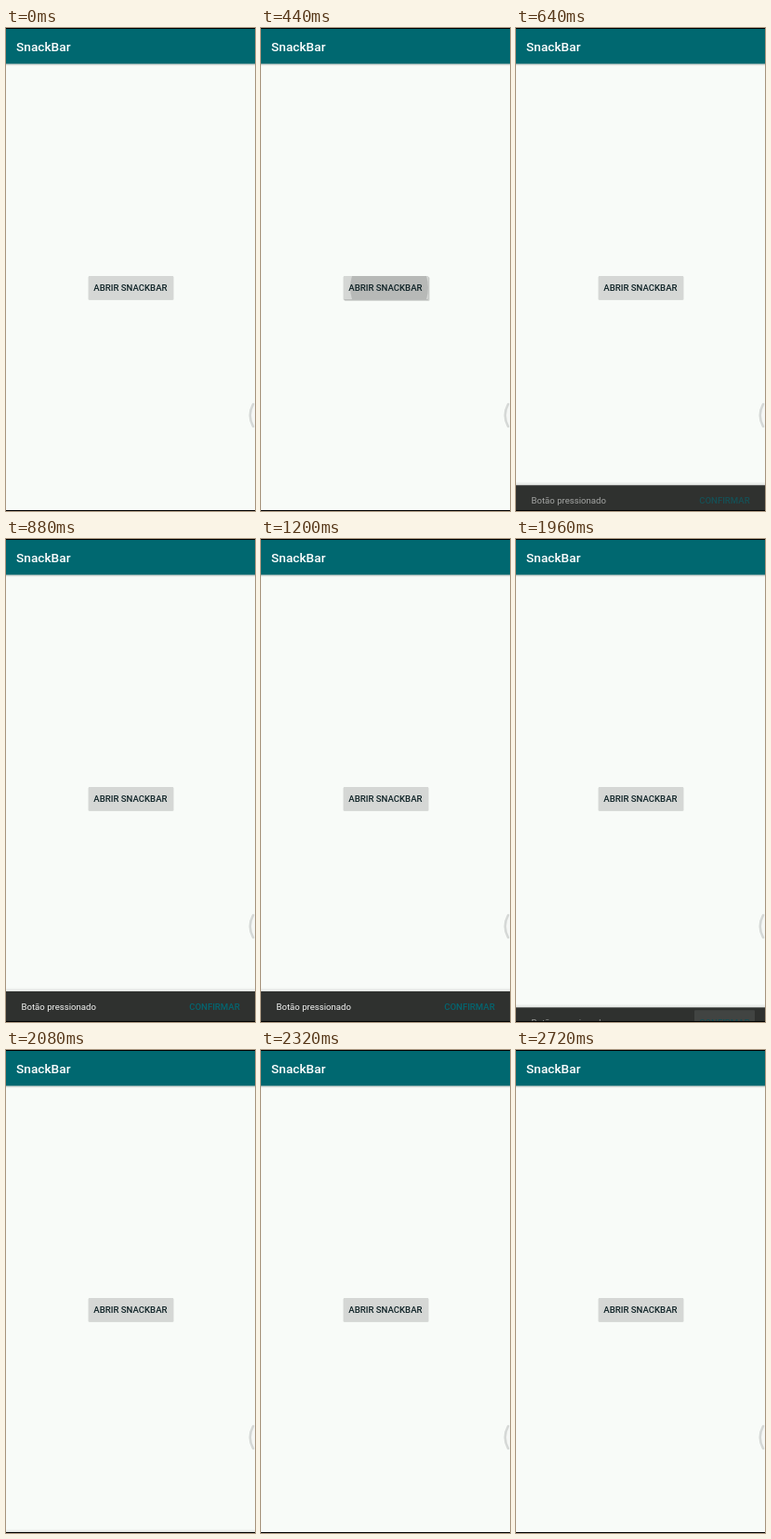
An HTML page for the animation above (2.84 s loop, 268x520 px).

```html
<!DOCTYPE html>
<html lang="pt">
<head>
<meta charset="utf-8">
<title>SnackBar</title>
<style>
  html, body { margin: 0; width: 100%; height: 100%; overflow: hidden; background: #f8fbf8; }
  svg { display: block; width: 100%; height: 100%; }
  text { font-family: Roboto, sans-serif; font-size: 9.6px; font-weight: 500; }
</style>
</head>
<body>
<svg viewBox="0 0 268 520" xmlns="http://www.w3.org/2000/svg">
  <defs>
    <linearGradient id="shade" x2="0" y2="1">
      <stop offset="0" stop-color="#000" stop-opacity=".25"/>
      <stop offset="1" stop-color="#000" stop-opacity="0"/>
    </linearGradient>
    <linearGradient id="lift" x2="0" y2="1">
      <stop offset="0" stop-color="#000" stop-opacity="0"/>
      <stop offset="1" stop-color="#000" stop-opacity=".1"/>
    </linearGradient>
    <clipPath id="openClip"><rect x="89" y="267" width="91" height="25" rx="1"/></clipPath>
    <clipPath id="okClip"><rect x="192" y="490" width="65" height="26" rx="1"/></clipPath>
  </defs>

  <rect width="268" height="520" fill="#f8fbf8"/>
  <rect y="38" width="268" height="3" fill="url(#shade)"/>
  <rect width="268" height="38.5" fill="#006870"/>
  <rect width="268" height="1" fill="#000"/>
  <text x="11" y="25" style="font-size:13.7px" fill="#fff">SnackBar</text>

  <rect id="press" x="89.5" y="268" width="92" height="26" rx="1.5" fill="#000" opacity="0"/>
  <rect x="88.5" y="267" width="92" height="26" rx="1.5" fill="#000" opacity=".13"/>
  <rect x="89" y="267" width="91" height="25" rx="1" fill="#d5d7d5"/>
  <g clip-path="url(#openClip)"><circle id="openRipple" cx="138" cy="279.5" fill="#000"/></g>
  <text x="94.3" y="282.8" fill="#0c2024">ABRIR SNACKBAR</text>

  <g id="bar">
    <rect y="483" width="268" height="4" fill="url(#lift)"/>
    <rect y="487" width="268" height="34" fill="#2f312f"/>
    <g id="content">
      <g clip-path="url(#okClip)"><circle id="okRipple" cx="225" cy="503" fill="#a3aaa6"/></g>
      <text x="16.5" y="506.8" fill="#f4f5f4" style="font-weight:400">Botão pressionado</text>
      <text x="197.2" y="506.8" fill="#046570">CONFIRMAR</text>
    </g>
  </g>

  <path d="M268.5 404.5H266Q258.5 417 266 429.5H268.5" fill="#f1f3f1" fill-opacity=".5"/>
  <path d="M266 405Q259.5 417 266 429" fill="none" stroke="#d5d8d6" stroke-width="2.6" stroke-linecap="round"/>
  <rect y="519" width="268" height="1" fill="#000"/>
</svg>

<script>
const LOOP = 2840, STEP = 40;
const SHOW = 500, HIDE = 1870, SLIDE = 250, TRAVEL = 33;
const el = id => document.getElementById(id);
const set = (id, attrs) => {
  for (const key in attrs) el(id).setAttribute(key, attrs[key]);
};
const ramp = (t, start, length) => Math.min(1, Math.max(0, (t - start) / length));

// cubic-bezier(.4, 0, .2, 1)
function ease(x) {
  let lo = 0, hi = 1;
  for (let i = 0; i < 24; i++) {
    const s = (lo + hi) / 2, r = 1 - s;
    if (1.2 * r * r * s + 0.6 * r * s * s + s ** 3 < x) lo = s; else hi = s;
  }
  return lo * lo * (3 - 2 * lo);
}

function ripple(id, t, start, hold, radius, strength) {
  const grow = ramp(t, start, 200);
  const fade = 1 - ramp(t, start + hold, 160);
  set(id, {
    r: grow ? 10 + (radius - 10) * (1 - (1 - grow) ** 2) : 0,
    opacity: grow ? strength * fade : 0
  });
}

function draw(t) {
  ripple("openRipple", t, 320, 130, 48, 0.14);
  set("press", { opacity: 0.14 * ramp(t, 320, 100) * (1 - ramp(t, 460, 120)) });
  ripple("okRipple", t, 1690, 290, 36, 0.3);

  const shown = ease(ramp(t, SHOW, SLIDE)) - ease(ramp(t, HIDE, SLIDE));
  set("bar", {
    transform: `translate(0 ${TRAVEL * (1 - shown)})`,
    visibility: t > SHOW && t < HIDE + SLIDE ? "visible" : "hidden"
  });
  set("content", {
    opacity: ease(ramp(t, SHOW + 70, 180)) * (1 - ease(ramp(t, HIDE, 180)) * 0.6) * (1 - ramp(t, HIDE + 120, 80))
  });
}

let origin;
function tick(now) {
  origin ??= now;
  const t = (now - origin) % LOOP;
  draw(Math.floor(t / STEP) * STEP);
  requestAnimationFrame(tick);
}
draw(0);
requestAnimationFrame(tick);
</script>
</body>
</html>
```
